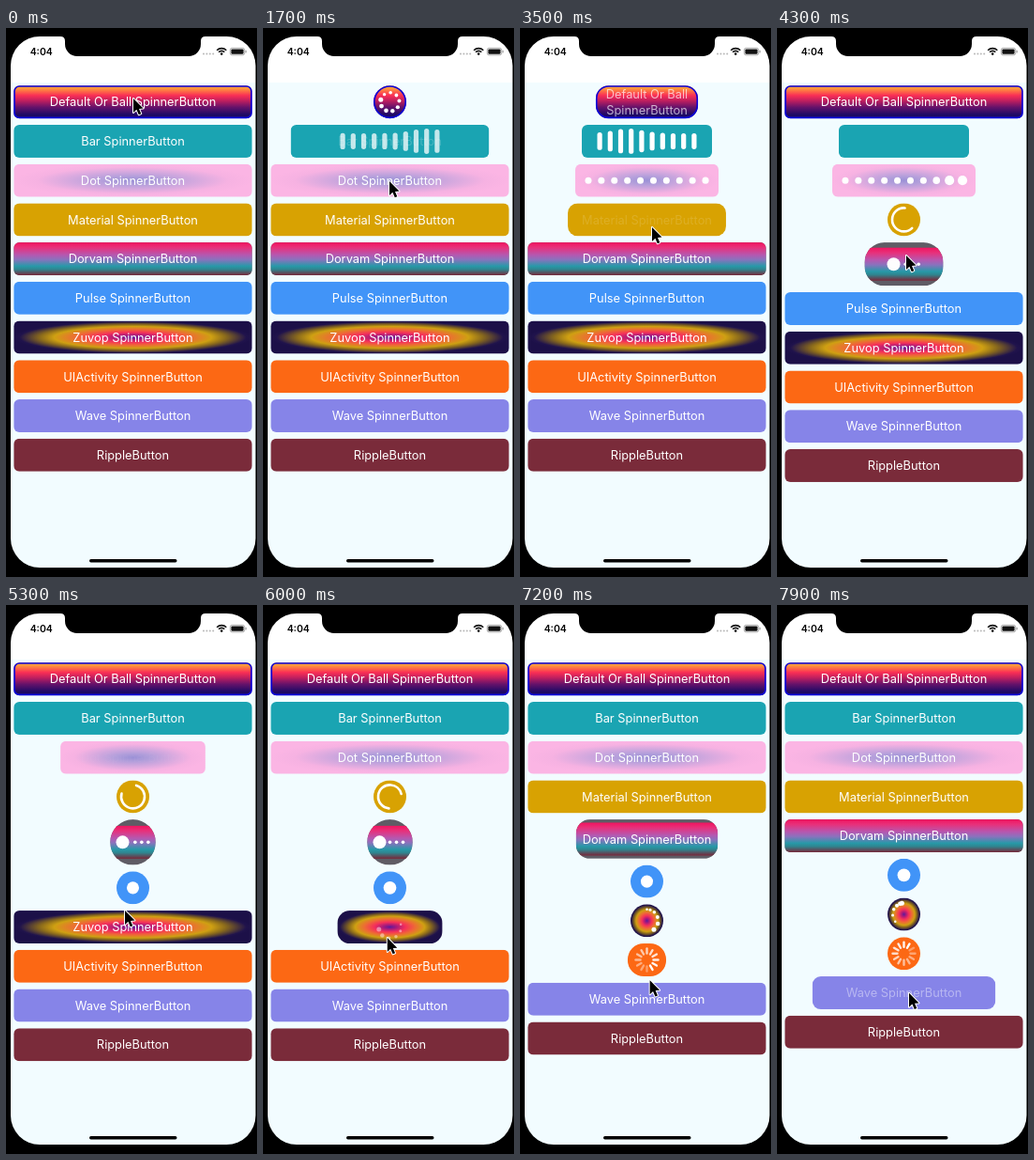
Animation, 268 px wide and 584 px high, one loop 8 s. Source, as an HTML page with a canvas:

```html
<!DOCTYPE html>
<html lang="en">
<head>
<meta charset="utf-8">
<title>Spinner buttons</title>
<style>
html, body { margin: 0; width: 268px; height: 584px; overflow: hidden; background: #000; }
canvas { display: block; }
</style>
</head>
<body>
<canvas id="stage" width="268" height="584"></canvas>
<script>
const ctx = document.getElementById('stage').getContext('2d');
const LOOP = 8000, STEP = 100, MORPH = 500;
const CX = 135.5, TOP = 61.2, PITCH = 41.73, FULL = 254.5, H = 35, TAU = Math.PI * 2;

const clamp = (v, lo = 0, hi = 1) => Math.min(hi, Math.max(lo, v));
const lerp = (a, b, k) => a + (b - a) * k;
const smooth = u => { u = clamp(u); return u * u * (3 - 2 * u); };
const mod = (a, n) => ((a % n) + n) % n;

// Each button shrinks at `on` and grows back at `off`.
const buttons = [
  { text: 'Default Or Ball SpinnerButton', wrap: ['Default Or Ball', 'SpinnerButton'], spin: balls, on: 620, off: 3305, border: '#0a00dc',
    rows: [[0, '#ffb535'], [.08, '#ff9a3c'], [.3, '#fa2f55'], [.46, '#c01f5f'], [.66, '#65126a'], [.88, '#1f0a66'], [1, '#170858']] },
  { text: 'Bar SpinnerButton', fill: '#1aa4b2', spin: bars, wide: 139, on: 1494, off: 4290 },
  { text: 'Dot SpinnerButton', spin: dots, wide: 153, on: 2400, off: 5260,
    rings: [[0, '#9a90d6'], [.25, '#b39fdb'], [.8, '#f6b2e2'], [1, '#fbb5e4']] },
  { text: 'Material SpinnerButton', fill: '#d8a202', spin: arc, on: 3287, off: 6260 },
  { text: 'Dorvam SpinnerButton', spin: chomp, tall: 48.5, on: 3932, off: 6950, fill: '#5f5c65',
    rows: [[0, '#f0145f'], [.15, '#e8307a'], [.38, '#b558b0'], [.52, '#8a72bd'], [.72, '#2799a8'], [.82, '#2f858f'], [1, '#7a2638']] },
  { text: 'Pulse SpinnerButton', fill: '#4194f8', spin: pulse, on: 4780 },
  { text: 'Zuvop SpinnerButton', spin: chase, on: 5700,
    rings: [[0, '#5b1b9a'], [.13, '#a81a7c'], [.3, '#f5305a'], [.48, '#ee6a35'], [.66, '#cfa012'], [.78, '#8a6a1c'], [.95, '#20134c'], [1, '#1c1048']] },
  { text: 'UIActivity SpinnerButton', fill: '#fc6814', spin: spokes, on: 6750 },
  { text: 'Wave SpinnerButton', fill: '#8684e8', on: 7730 },
  { text: 'RippleButton', fill: '#7a2b3a' }
];

// Pointer tip: time, x, y
const path = [
  [0, 136, 75], [700, 136, 75], [1250, 135, 121], [1450, 135, 123], [1700, 135, 163], [2500, 135, 164],
  [3100, 141, 209], [3500, 141, 212], [3900, 138, 241], [4300, 138, 242], [4750, 130, 300],
  [5300, 127, 325], [5800, 132, 345], [6400, 135, 380], [6800, 135, 381], [7500, 141, 411], [8000, 141, 413]
];

function disc(x, y, r) {
  ctx.beginPath();
  ctx.arc(x, y, r, 0, TAU);
  ctx.fill();
}

function box(x, y, w, h, r) {
  ctx.beginPath();
  ctx.roundRect(x, y, w, h, r);
}

function addStops(g, stops) {
  stops.forEach(s => g.addColorStop(s[0], s[1]));
  return g;
}

function balls(y, t) {
  for (let i = 0; i < 9; i++) {
    const a = i / 9 * TAU + t / 1000 * 2.4;
    disc(CX + 10 * Math.cos(a), y + 10 * Math.sin(a), 1.7 + .8 * i / 8);
  }
}

function bars(y, t) {
  const head = mod((t - 1700) / 100 + 8, 11.65);
  for (let i = 0; i < 10; i++) {
    const d = Math.abs(i - head), near = Math.min(d, 11.65 - d);
    const h = 17 + 10 * Math.exp(-near * near / 4);
    box(CX + (i - 4.5) * 11.2 - 2.6, y - h / 2, 5.2, h, 2.6);
    ctx.fill();
  }
}

function dots(y, t) {
  const head = mod((t - 4300) / 60 + 11.5, 16) - 3;
  for (let i = 0; i < 10; i++) {
    const d = i - head;
    disc(CX + (i - 4.5) * 13.9, y, 3.5 + 1.9 * Math.exp(-d * d / 1.2));
  }
}

function arc(y, t) {
  const turn = (t - 4300) / 1000 * 4.2 + .8;
  const sweep = 4 + .7 * Math.sin((t - 4300) / 1000 * 1.5);
  ctx.lineWidth = 2.6;
  ctx.lineCap = 'round';
  ctx.beginPath();
  ctx.arc(CX, y, 12.5, turn, turn + sweep);
  ctx.stroke();
}

function chomp(y, t) {
  const shift = mod(t / 75, 7);
  for (let i = 0; i < 3; i++) disc(CX + 14 - i * 7 + 3 - shift, y, 1.8);
  disc(CX - 11, y, 7);
}

function pulse(y, t) {
  disc(CX, y, 7.3 + .9 * Math.sin((t - 5300) / 1000 * TAU * 1.05 - 1));
}

function chase(y, t) {
  for (let i = 0; i < 6; i++) {
    const k = smooth(mod(t - 6600 - i * 95, 1500) / 1350);
    const a = k * TAU - Math.PI / 2 - .15;
    disc(CX + 12 * Math.cos(a), y + 12 * Math.sin(a), 2.5 - i * .25);
  }
}

function spokes(y, t) {
  const head = Math.floor(t / 1000 * 12) % 12;
  ctx.lineWidth = 2.4;
  ctx.lineCap = 'round';
  const base = ctx.globalAlpha;
  for (let i = 0; i < 12; i++) {
    const a = i / 12 * TAU, c = Math.cos(a), s = Math.sin(a);
    ctx.globalAlpha = base * (1 - mod(head - i, 12) * .06);
    ctx.beginPath();
    ctx.moveTo(CX + 7 * c, y + 7 * s);
    ctx.lineTo(CX + 12 * c, y + 12 * s);
    ctx.stroke();
  }
}

function label(b, w, y) {
  ctx.font = '400 12.85px Inter, "Liberation Sans", sans-serif';
  ctx.textAlign = 'center';
  if (b.wrap && w < 182) {
    b.wrap.forEach((line, i) => ctx.fillText(line, CX, y - 3.4 + i * 16.3));
  } else {
    ctx.fillText(b.text, CX, y + 4.7);
  }
}

function drawButton(b, y, t) {
  const shrunk = smooth((t - b.on) / MORPH) || 0;
  const back = smooth((t - b.off) / MORPH) || 0;
  const k = shrunk * (1 - back);
  const small = b.tall || H;
  const h = lerp(H, small, k);
  const w = lerp(FULL, b.wide || small, k);
  const r = b.wide ? 6 : lerp(6, small / 2, k);
  const x = CX - w / 2, mid = y + h / 2;

  ctx.save();
  box(x, y, w, h, r);
  ctx.clip();
  if (b.fill) {
    ctx.fillStyle = b.fill;
    ctx.fillRect(x, y, w, h);
  }
  if (b.rows) {
    const top = mid - H / 2;
    ctx.fillStyle = addStops(ctx.createLinearGradient(0, top, 0, top + H), b.rows);
    ctx.fillRect(x, top, w, H);
  }
  if (b.rings) {
    ctx.save();
    ctx.translate(CX, mid);
    ctx.scale(w / 2, h / 2);
    ctx.fillStyle = addStops(ctx.createRadialGradient(0, 0, 0, 0, 0, 1), b.rings);
    ctx.fillRect(-1, -1, 2, 2);
    ctx.restore();
  }
  ctx.fillStyle = ctx.strokeStyle = '#fff';
  ctx.globalAlpha = t >= b.off ? clamp(back * 2) : clamp(1 - shrunk * 2.2);
  label(b, w, mid);
  if (b.spin && !(t >= b.off)) {
    ctx.globalAlpha = b.wide ? clamp(shrunk * 2) : clamp((shrunk - .5) * 3);
    b.spin(mid, t);
  }
  ctx.restore();

  if (b.border) {
    ctx.strokeStyle = b.border;
    ctx.lineWidth = 1.6;
    box(x + .8, y + .8, w - 1.6, h - 1.6, r - .8);
    ctx.stroke();
  }
  return h;
}

function drawScreen() {
  ctx.fillStyle = '#000';
  ctx.fillRect(0, 0, 268, 584);
  ctx.save();
  box(5, 9, 261.5, 565, 31);
  ctx.clip();
  ctx.fillStyle = '#fff';
  ctx.fillRect(0, 0, 268, 58);
  ctx.fillStyle = '#f2fcff';
  ctx.fillRect(0, 58, 268, 526);
  ctx.restore();
}

function drawChrome() {
  ctx.fillStyle = '#000';
  ctx.beginPath();
  ctx.moveTo(58, 8);
  ctx.lineTo(58, 9);
  ctx.quadraticCurveTo(63, 9, 63, 14);
  ctx.lineTo(63, 17);
  ctx.arcTo(63, 30, 76, 30, 13);
  ctx.lineTo(195, 30);
  ctx.arcTo(208, 30, 208, 17, 13);
  ctx.lineTo(208, 14);
  ctx.quadraticCurveTo(208, 9, 213, 9);
  ctx.lineTo(213, 8);
  ctx.fill();

  ctx.font = '600 10.4px Inter, "Liberation Sans", sans-serif';
  ctx.textAlign = 'left';
  ctx.fillText('4:04', 25.7, 28.8);

  ctx.fillStyle = '#b8b8b8';
  for (let i = 0; i < 4; i++) disc(211 + i * 3.4, 27.6, 1);

  ctx.strokeStyle = ctx.fillStyle = '#111';
  ctx.lineCap = 'butt';
  ctx.lineWidth = 1.6;
  for (const r of [7.2, 4.4]) {
    ctx.beginPath();
    ctx.arc(230.2, 28.8, r, -Math.PI * .75, -Math.PI * .25);
    ctx.stroke();
  }
  disc(230.2, 27.6, 1.3);

  ctx.lineWidth = .7;
  ctx.strokeStyle = '#888';
  box(239.3, 21.3, 15.4, 7.6, 2.2);
  ctx.stroke();
  box(240.4, 22.4, 13.2, 5.4, 1.2);
  ctx.fill();
  ctx.fillStyle = '#888';
  ctx.fillRect(255.6, 23.8, 1, 2.6);

  ctx.fillStyle = '#000';
  box(89, 565, 93.5, 3.4, 1.7);
  ctx.fill();
}

function drawPointer(t) {
  const i = Math.max(1, path.findIndex(p => p[0] > t));
  const a = path[i - 1], b = path[i];
  const k = smooth((t - a[0]) / (b[0] - a[0]));
  ctx.save();
  ctx.translate(lerp(a[1], b[1], k), lerp(a[2], b[2], k));
  ctx.beginPath();
  [[0, 0], [0, 15], [3.4, 11.8], [5.8, 17.3], [8.3, 16.2], [6, 10.9], [10.5, 10.6]]
    .forEach(p => ctx.lineTo(p[0], p[1]));
  ctx.closePath();
  ctx.lineJoin = 'round';
  ctx.lineWidth = 2;
  ctx.strokeStyle = '#fff';
  ctx.fillStyle = '#000';
  ctx.stroke();
  ctx.fill();
  ctx.restore();
}

function draw(t) {
  drawScreen();
  let y = TOP;
  for (const b of buttons) y += drawButton(b, y, t) + PITCH - H;
  drawChrome();
  drawPointer(t);
}

const begin = performance.now();
function tick() {
  const t = (performance.now() - begin) % LOOP;
  draw(Math.floor(t / STEP) * STEP);
  requestAnimationFrame(tick);
}
tick();
</script>
</body>
</html>
```
